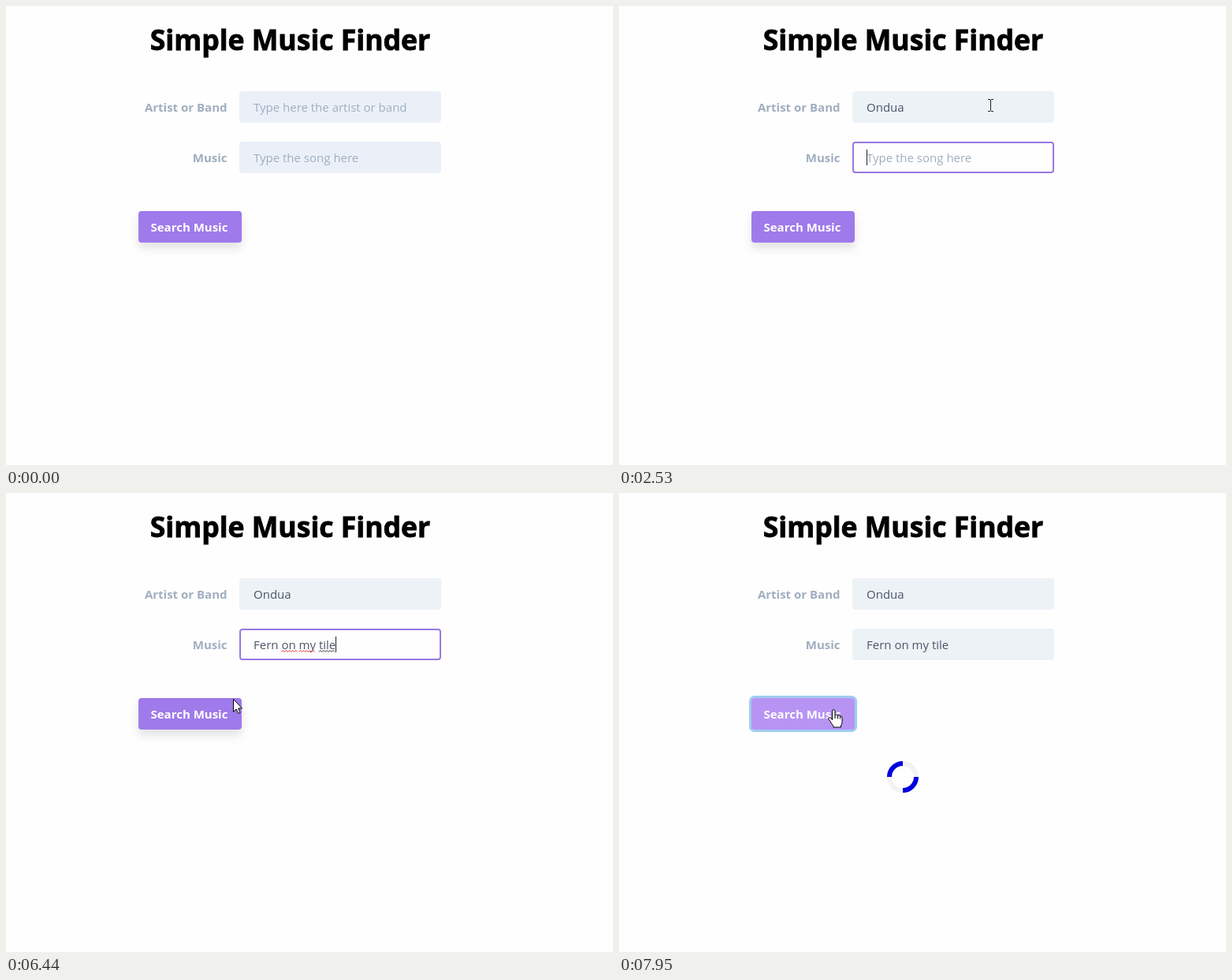
Animation of 770 by 582 pixels, one loop 8000 ms. Source, as an HTML page:

```html
<!DOCTYPE html>
<html lang="en">
<head>
<meta charset="utf-8">
<title>Simple Music Finder</title>
<style>
  html, body { margin: 0; width: 100%; height: 100%; overflow: hidden; background: #fefefe; }
  svg { display: block; width: 770px; height: 582px; }
  text { font: 15px "Open Sans", "Noto Sans", sans-serif; white-space: pre; }
  .title { font-size: 35.6px; font-weight: 700; text-anchor: middle; stroke: #000; stroke-width: .8px; }
  .label { font-weight: 700; fill: #a0aec0; text-anchor: end; }
  .box { fill: #ebf0f8; stroke: #ebf0f8; stroke-width: 2px; }
  .box.filled { fill: #edf2f7; stroke: #edf2f7; }
  .box.focus { fill: #fefefe; stroke: #9779e2; }
  .value { fill: #4a5568; }
  .value.hint { fill: #a0aec0; }
  .wave { fill: none; stroke: #e02b2b; stroke-width: 1px; }
  .wave.dark { stroke: #333; }
  .btn { fill: #9f7aea; filter: drop-shadow(0 7px 6px rgba(0, 0, 0, .11)); }
  .btn.hover { fill: #b794f4; }
  .btn.focus { filter: none; }
  .btn-text { font-weight: 700; fill: #fff; }
  .cursor { fill: #fff; stroke: #000; stroke-width: 1px; stroke-linejoin: round; }
  #ibeam { fill: none; stroke: #222; }
</style>
</head>
<body>
<svg viewBox="0 0 770 582">
  <text class="title" x="360.5" y="56">Simple Music Finder</text>
  <text class="label" x="280.5" y="134">Artist or Band</text>
  <text class="label" x="280.5" y="198">Music</text>

  <g id="fields"></g>

  <rect id="ring" x="165" y="257" width="137" height="46" rx="7" fill="#a0ccf0"/>
  <rect id="btn" class="btn" x="168" y="260" width="131" height="40" rx="4"/>
  <text class="btn-text" x="183.5" y="286">Search Music</text>

  <g id="spinner" fill="none" stroke-width="6">
    <circle cx="360" cy="360" r="17" stroke="#f3f3f3"/>
    <path id="arcs" stroke="#0000e0" d="M347.98 347.98a17 17 0 0 1 24.04 0M372.02 372.02a17 17 0 0 1 -24.04 0"/>
  </g>

  <circle id="glow" r="12" fill="#ff0" fill-opacity=".52"/>
  <path id="ibeam" class="cursor" d="M-3 -7.5H0M1 -7.5H4M-3 7.5H0M1 7.5H4M.5 -7V7"/>
  <path id="arrow" class="cursor" d="M.5 .5V16.5L4.2 13L6.6 18.5L9 17.5L6.7 12H11.5Z"/>
  <path id="hand" class="cursor" d="M-.5 14V2.2Q-.5 .7 1.3 .7Q3 .7 3 2.2V7.5Q6.5 6 6.5 8.3Q9.5 7 9.5 9.2Q12 8.3 12 10.8V16.5Q12 19 10.5 21V23H1V21.5Q-1.5 18.5 -3 15.5L-5.2 12.6Q-5.8 10.8 -4 10.7Q-2.5 10.8 -.5 13.2M3 7.5V12M6.5 8.3V12.3M9.5 9.2V12.5"/>
</svg>
<script>
const LOOP = 8000, BLINK = 505, TEXT_X = 314;
const CLICK_FIELD = 1020, TAB = 2530, HOVER = 6500, CLICK_BTN = 6980, SPIN = 7120;

const $ = id => document.getElementById(id);
const pen = document.createElement('canvas').getContext('2d');
const widthOf = s => {
  pen.font = '15px "Open Sans", "Noto Sans", sans-serif';
  return pen.measureText(s).width;
};
const show = (el, on) => el.setAttribute('visibility', on ? 'visible' : 'hidden');
const place = (el, x, y) => el.setAttribute('transform', `translate(${x} ${y})`);

function make(tag, attrs) {
  const el = document.createElementNS('http://www.w3.org/2000/svg', tag);
  for (const k in attrs) el.setAttribute(k, attrs[k]);
  return $('fields').appendChild(el);
}

function makeField(y, hint, text, keys, from, to) {
  return {
    hint, text, keys, from, to,
    box: make('rect', { x: 297, y: y + 1, width: 254, height: 38, rx: 3 }),
    value: make('text', { x: TEXT_X, y: y + 26 }),
    caret: make('rect', { y: y + 10, width: 1, height: 20, fill: '#222' })
  };
}

const song = 'Fern on my tile';
const fields = [
  makeField(108, 'Type here the artist or band', 'Ondua',
    [1810, 1950, 2140, 2240, 2330], CLICK_FIELD, TAB),
  makeField(172, 'Type the song here', song,
    [3010, 3620, 3690, 3750, 3890, 4090, 4190, 4280, 4430, 4620, 4820, 5090, 5220, 5360, 5420],
    TAB, CLICK_BTN)
];

// spell-check marks: word and the time it is flagged
const waves = [['on', 4280], ['my', 4820], ['tile', 5970]].map(([word, at], i) => {
  const x = TEXT_X + widthOf(song.slice(0, song.indexOf(word)));
  const n = Math.round(widthOf(word) / 4);
  const d = `M${x} 201.5` + 'l2 -2l2 2'.repeat(n);
  return { at, el: make('path', { d, class: i === 2 ? 'wave dark' : 'wave' }) };
});

function drawField(f, t) {
  const count = f.keys.filter(k => k <= t).length;
  const typed = f.text.slice(0, count);
  const focus = t >= f.from && t < f.to;
  const since = t - (count ? f.keys[count - 1] : f.from);
  f.box.setAttribute('class', 'box' + (focus ? ' focus' : count ? ' filled' : ''));
  f.value.setAttribute('class', count ? 'value' : 'value hint');
  f.value.textContent = typed || f.hint;
  f.caret.setAttribute('x', Math.floor(TEXT_X + widthOf(typed)));
  show(f.caret, focus && Math.floor(since / BLINK) % 2 === 0);
}

const stepped = (t, from, step) => from + Math.floor((t - from) / step) * step;
const clamp = u => Math.min(1, Math.max(0, u));
const mix = (a, b, u) => Math.round(a + (b - a) * u);

function pointer(t) {
  if (t < 5970) {
    const u = clamp((stepped(t, 260, 69) - 240) / 710);
    const e = 1 - (1 - u ** 1.2) ** 2;
    return [mix(718, 471, e), mix(576, 126, e)];
  }
  const u = clamp((stepped(t, 5970, 67) - 5900) / 810);
  const e = 1 - (1 - u ** 1.2) ** 2.6;
  return [mix(471, 271, e), mix(126, 274, e)];
}

function drawPointer(t) {
  const [x, y] = pointer(t);
  const inRow = top => y >= top && y < top + 40;
  const onField = x >= 296 && x < 552 && (inRow(108) || inRow(172));
  const kind = t < 260 ? '' : t >= HOVER ? 'hand' : onField ? 'ibeam' : 'arrow';
  for (const id of ['ibeam', 'arrow', 'hand']) {
    show($(id), id === kind);
    place($(id), x, y);
  }
  const first = t >= CLICK_FIELD && t < 1090;
  const second = t >= CLICK_BTN && t < 7120;
  show($('glow'), first || second);
  place($('glow'), first ? x - 2 : x, first ? y - 1 : y);
}

function draw(t) {
  fields.forEach(f => drawField(f, t));
  waves.forEach(w => show(w.el, t >= w.at && t < CLICK_BTN));
  const pressed = t >= CLICK_BTN;
  show($('ring'), pressed);
  $('btn').setAttribute('class', 'btn' + (t >= HOVER ? ' hover' : '') + (pressed ? ' focus' : ''));
  show($('spinner'), t >= SPIN);
  const angle = (stepped(t, CLICK_BTN, 69) - 7196) * 0.18;
  $('arcs').setAttribute('transform', `rotate(${angle} 360 360)`);
  drawPointer(t);
}

const start = performance.now();
function tick() {
  draw((performance.now() - start) % LOOP);
  requestAnimationFrame(tick);
}
tick();
</script>
</body>
</html>
```
